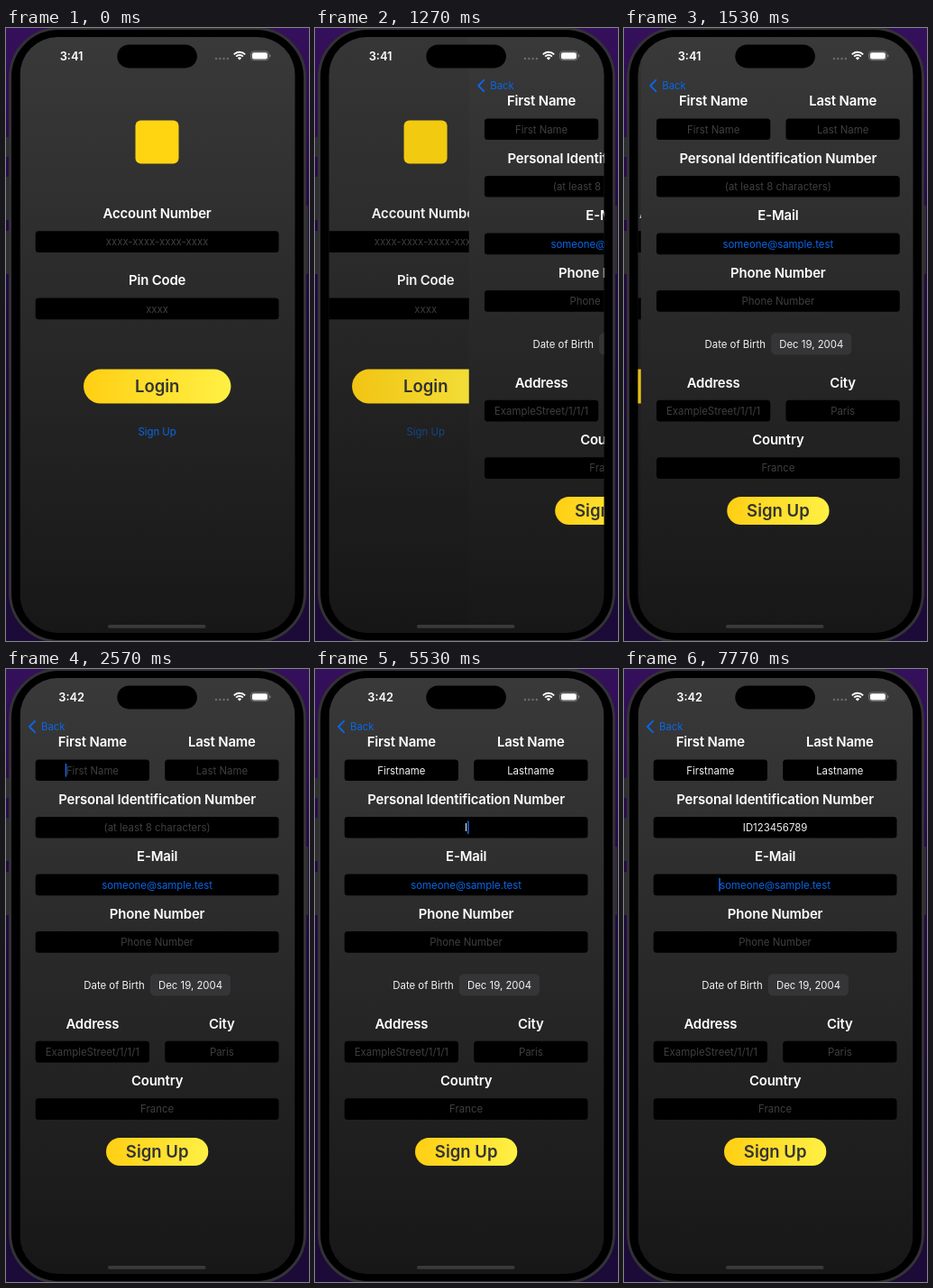
Animation of 336x680 px, one loop 8000 ms. Source, as an HTML page:

```html
<!DOCTYPE html>
<html lang="en">
<head>
<meta charset="utf-8">
<title>Sign up form</title>
<style>
  html, body { margin: 0; width: 100%; height: 100%; overflow: hidden; background: #1c0a38; }
  svg { display: block; width: 336px; height: 680px; }
  text { font-family: Inter, Roboto, sans-serif; font-size: 11.4px; fill: #f2f2f2; text-anchor: middle; }
  .label { font-size: 14.9px; font-weight: 600; letter-spacing: -.15px; fill: #fff; }
  .hint { fill: #3f3f41; }
  .blue { fill: #0b66e4; }
  .cta { font-size: 18.5px; font-weight: 600; fill: #333; }
  .clock { font-size: 12.8px; font-weight: 600; fill: #fff; }
</style>
</head>
<body>
<svg id="stage" viewBox="0 0 336 680"></svg>
<script>
const LOOP = 8000, WIDTH = 305, PUSH = 1177, SETTLED = 1700;
const $ = id => document.getElementById(id);

const rect = (x, y, w, h, r, fill, more = '') =>
  `<rect x="${x}" y="${y}" width="${w}" height="${h}" rx="${r}" fill="${fill}" ${more}/>`;
const text = (x, y, s, cls = '', id = '') =>
  `<text x="${x}" y="${y}" class="${cls}" id="${id}">${s}</text>`;
const button = (x, y, w, h, s) =>
  rect(x, y, w, h, h / 2, 'url(#gold)') + text(x + w / 2, y + h / 2 + 6.8, s, 'cta');
const wide = { x: 32.7, w: 269.8 }, left = { x: 32.7, w: 126.3 }, right = { x: 176.2, w: 126.3 };
const middle = slot => slot.x + slot.w / 2;
const field = (slot, y, label, hint, id = '', cls = 'hint') =>
  text(middle(slot), y - 14.2, label, 'label') +
  rect(slot.x, y, slot.w, 23.7, 3.5, '#000') +
  text(middle(slot), y + 16.1, hint, cls, id);
const gradient = (id, coords, ...colors) =>
  `<linearGradient id="${id}" ${coords}>${colors.map((c, i) =>
    `<stop offset="${i / (colors.length - 1)}" stop-color="${c}"/>`).join('')}</linearGradient>`;
const backdrop = rect(15.5, 10, WIDTH, 661, 0, 'url(#page)');

const login = backdrop +
  rect(143.5, 102.5, 48, 48, 6, '#ffd511') +
  field(wide, 225.3, 'Account Number', 'xxxx-xxxx-xxxx-xxxx') +
  field(wide, 299.5, 'Pin Code', 'xxxx') +
  button(86, 378.6, 163.4, 38, 'Login') +
  text(167.6, 451.8, 'Sign Up', 'blue', 'link');

const form = backdrop +
  '<path d="M32 57.8 L26 64 L32 70.2" fill="none" stroke="#0b66e4" stroke-width="1.9" stroke-linecap="round" stroke-linejoin="round"/>' +
  text(52.3, 68.2, 'Back', 'blue') +
  field(left, 100.4, 'First Name', '', 'first') +
  field(right, 100.4, 'Last Name', '', 'last') +
  field(wide, 163.9, 'Personal Identification Number', '', 'pin') +
  field(wide, 227.5, 'E-Mail', '', 'mail') +
  field(wide, 291, 'Phone Number', 'Phone Number') +
  text(120, 354.6, 'Date of Birth') +
  rect(159.8, 338.2, 89.2, 24.4, 5.5, '#353537') +
  text(204.5, 354.6, 'Dec 19, 2004') +
  field(left, 412.8, 'Address', 'ExampleStreet/1/1/1') +
  field(right, 412.8, 'City', 'Paris') +
  field(wide, 476.3, 'Country', 'France') +
  button(111, 520, 113.3, 31, 'Sign Up') +
  rect(0, 0, 1.5, 15, .7, '#1768ee', 'id="caret"');

const arc = r => `<path d="M${259 - r * .72} ${35.5 - r * .72} A${r} ${r} 0 0 1 ${259 + r * .72} ${35.5 - r * .72}" fill="none" stroke="#fff" stroke-width="1.9"/>`;
const status =
  rect(123.3, 18.4, 88.6, 26, 13, '#000') +
  text(72.6, 35.6, '3:41', 'clock', 'clock') +
  [233, 237.3, 241.6, 245.9].map(x => `<circle cx="${x}" cy="34" r="1.2" fill="#6c6c6c"/>`).join('') +
  arc(8.6) + arc(5.3) + '<path d="M256.8 33.2 Q259 31.4 261.2 33.2 L259 35.6 Z" fill="#fff"/>' +
  rect(271.6, 26, 19.6, 9.6, 3, 'none', 'stroke="#858585" stroke-width=".8"') +
  rect(272.9, 27.2, 17, 7.2, 2, '#fff') +
  rect(292.2, 29.3, 1.2, 3, .6, '#858585') +
  rect(113, 662, 108.5, 3.8, 1.9, '#3a3a3a');

$('stage').innerHTML = '<defs>' +
  gradient('wall', 'x2="0" y2="1"', '#35105c', '#220a42', '#1b0a36', '#1c0a38') +
  gradient('page', 'gradientUnits="userSpaceOnUse" x1="0" y1="10" x2="0" y2="671"', '#393939', '#171717') +
  gradient('gold', '', '#ffcf14', '#fff044') +
  `<clipPath id="screen">${rect(15.5, 10, WIDTH, 661, 42, '#000')}</clipPath></defs>` +
  rect(0, 0, 336, 680, 0, 'url(#wall)') +
  [[121, 22], [165, 48], [225, 48]].map(([y, h]) => rect(-1, y, 6, h, 1, '#2e2d30')).join('') +
  rect(331, 197, 4, 76, 1, '#2e2d30') +
  rect(4.5, .5, 327, 680, 54, '#000', 'stroke="#333235" stroke-width="3"') +
  `<g clip-path="url(#screen)"><g id="login">${login}</g>` +
  rect(15.5, 10, WIDTH, 661, 0, '#000', 'id="dim"') +
  `<g id="form">${form}</g>${status}</g>`;

// Each input: when it holds the caret and when each key lands.
const inputs = [
  { id: 'first', slot: left, y: 104.7, hint: 'First Name', word: 'Firstname', focus: [2570, 3870],
    keys: Array.from({ length: 9 }, (_, i) => 3100 + i * 78.75) },
  { id: 'last', slot: right, y: 104.7, hint: 'Last Name', word: 'Lastname', focus: [3900, 5230],
    keys: [4070, 4130, 4230, 4370, 4800, 4900, 5000, 5070] },
  { id: 'pin', slot: wide, y: 168.2, hint: '(at least 8 characters)', word: 'ID123456789', focus: [5230, 7730],
    keys: [5530, 5670, 5870, 5970, 6070, 6230, 6470, 6600, 6730, 7000, 7330] },
  { id: 'mail', slot: wide, y: 231.8, hint: 'someone@sample.test', hintClass: 'blue', word: '', focus: [7770, LOOP], keys: [] }
];

// Critically damped spring, stepped at 30 pictures a second.
function pushed(t) {
  if (t >= SETTLED) return 1;
  const x = Math.max(0, Math.floor((t + 4) * .03) / .03 - PUSH) * .0184;
  return 1 - (1 + x) * Math.exp(-x);
}

function linkOpacity(t) {
  if (t < 1030) return 1;
  const press = Math.min(1, (t - 1000) / 110);
  const release = Math.min(1, Math.max(0, (t - 1130) / 370));
  return 1 - .7 * press * (1 - release);
}

function draw(t) {
  const p = pushed(t);
  $('login').setAttribute('transform', `translate(${-.3 * WIDTH * p})`);
  $('login').setAttribute('visibility', p < 1 ? 'visible' : 'hidden');
  $('form').setAttribute('transform', `translate(${WIDTH * (1 - p)})`);
  $('dim').setAttribute('opacity', .1 * p);
  $('link').setAttribute('opacity', linkOpacity(t));
  $('clock').textContent = t < 2230 ? '3:41' : '3:42';

  const caret = $('caret');
  caret.setAttribute('opacity', 0);
  for (const { id, slot, y, hint, hintClass = 'hint', word, focus, keys } of inputs) {
    const typed = word.slice(0, keys.filter(k => t >= k).length);
    const el = $(id);
    el.textContent = typed || hint;
    el.setAttribute('class', typed ? '' : hintClass);
    if (t < focus[0] || t >= focus[1]) continue;
    const half = el.getComputedTextLength() / 2;
    caret.setAttribute('x', middle(slot) + (typed ? half : -half - 1));
    caret.setAttribute('y', y);
    caret.setAttribute('opacity', 1);
  }
}

const start = performance.now();
function tick() {
  draw((performance.now() - start) % LOOP);
  requestAnimationFrame(tick);
}
tick();
</script>
</body>
</html>
```
